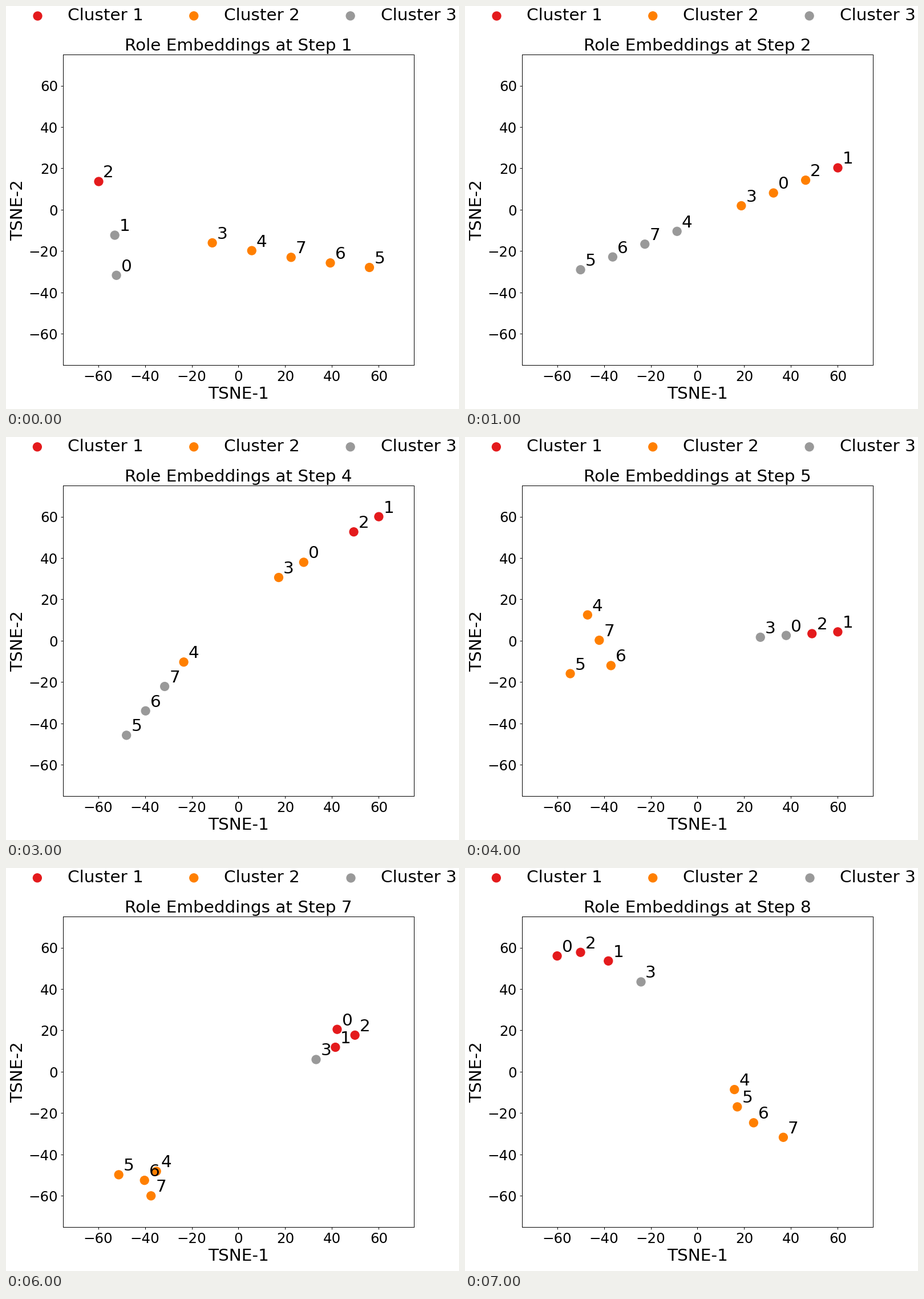
A matplotlib script that plays this animation: 794x706 px, repeating every 8 s.

```python
import matplotlib.pyplot as plt
import numpy as np
from matplotlib.animation import FuncAnimation

COLORS = {"1": "#e41a1c", "2": "#ff7f00", "3": "#999999"}
BIG, SMALL = 23.85, 19.8  # font sizes
OFFSET = 2  # gap between a point and its label, in data units

# Per step: cluster of roles 0 to 7, then chains of roles spread evenly along
# a curve through a few key points (x + yj). A space leaves an empty slot.
STEPS = [
    ("33122222", {"210": [-60 + 13.8j, -52.9 - 12.3j, -52.2 - 31.7j],
                  "34765": [-11.2 - 16j, 22.5 - 23j, 56 - 27.9j]}),
    ("21223333", {"5674 3021": [-50 - 29j, 60 + 20.5j]}),
    ("22221311", {"5674 3021": [-47.8 - 60j, 60 + 42.6j]}),
    ("21122333", {"5674": [-47.9 - 45.7j, -23.4 - 10.3j],
                  "30 21": [17.2 + 30.6j, 60 + 60j]}),
    ("31132222", {"3021": [26.9 + 1.7j, 60 + 4.3j],
                  "476": [-47 + 12.5j, -37 - 12j],
                  "5": [-54.4 - 15.9j]}),
    ("11132222", {"3021": [36 + 5j, 60 + 18j],
                  "5674": [-50 - 10j, -35 + 4j]}),
    ("11132222", {"312": [33.1 + 6j, 49.8 + 17.7j],
                  "0": [42.2 + 20.5j],
                  "567": [-51.2 - 49.8j, -40.2 - 52.5j, -37.4 - 60j],
                  "4": [-35.1 - 48.1j]}),
    ("11132222", {"0213": [-60 + 56j, -44.3 + 56.4j, -24.3 + 43.5j],
                  "4567": [15.8 - 8.6j, 19.8 - 20.9j, 36.7 - 31.7j]}),
]

plt.rcParams["font.family"] = "DejaVu Sans"
fig, ax = plt.subplots(figsize=(8.925, 7.935), dpi=89)
fig.subplots_adjust(left=0.126, right=0.9, bottom=0.1095, top=0.879)


def place(chains):
    """Map each role to its position on the curve of its chain."""
    points = {}
    for roles, keys in chains.items():
        curve = np.polyfit(np.linspace(0, 1, len(keys)), keys, len(keys) - 1)
        spots = np.polyval(curve, np.linspace(0, 1, len(roles)))
        points.update((int(r), p) for r, p in zip(roles, spots) if r != " ")
    return points


def draw(i):
    groups, chains = STEPS[i]
    points = place(chains)
    ax.clear()
    for key, color in COLORS.items():
        members = np.array([p for r, p in points.items() if groups[r] == key])
        ax.scatter(members.real, members.imag, s=148,
                   color=[color] * len(members), label=f"Cluster {key}")
    for role, p in points.items():
        ax.text(p.real + OFFSET, p.imag + OFFSET, str(role), fontsize=BIG)

    ax.set(xlim=(-75, 75), ylim=(-75, 75),
           xticks=range(-60, 61, 20), yticks=range(-60, 61, 20))
    ax.tick_params(labelsize=SMALL)
    ax.set_title(f"Role Embeddings at Step {i + 1}", fontsize=BIG)
    ax.set_xlabel("TSNE-1", fontsize=BIG)
    ax.set_ylabel("TSNE-2", fontsize=BIG)
    ax.legend(loc="upper center", bbox_to_anchor=(0.5, 1.2), ncol=3,
              fontsize=BIG, frameon=False)
    return []


anim = FuncAnimation(fig, draw, frames=len(STEPS), interval=1000,
                     init_func=lambda: [], repeat=True, repeat_delay=0)
plt.show()
```
